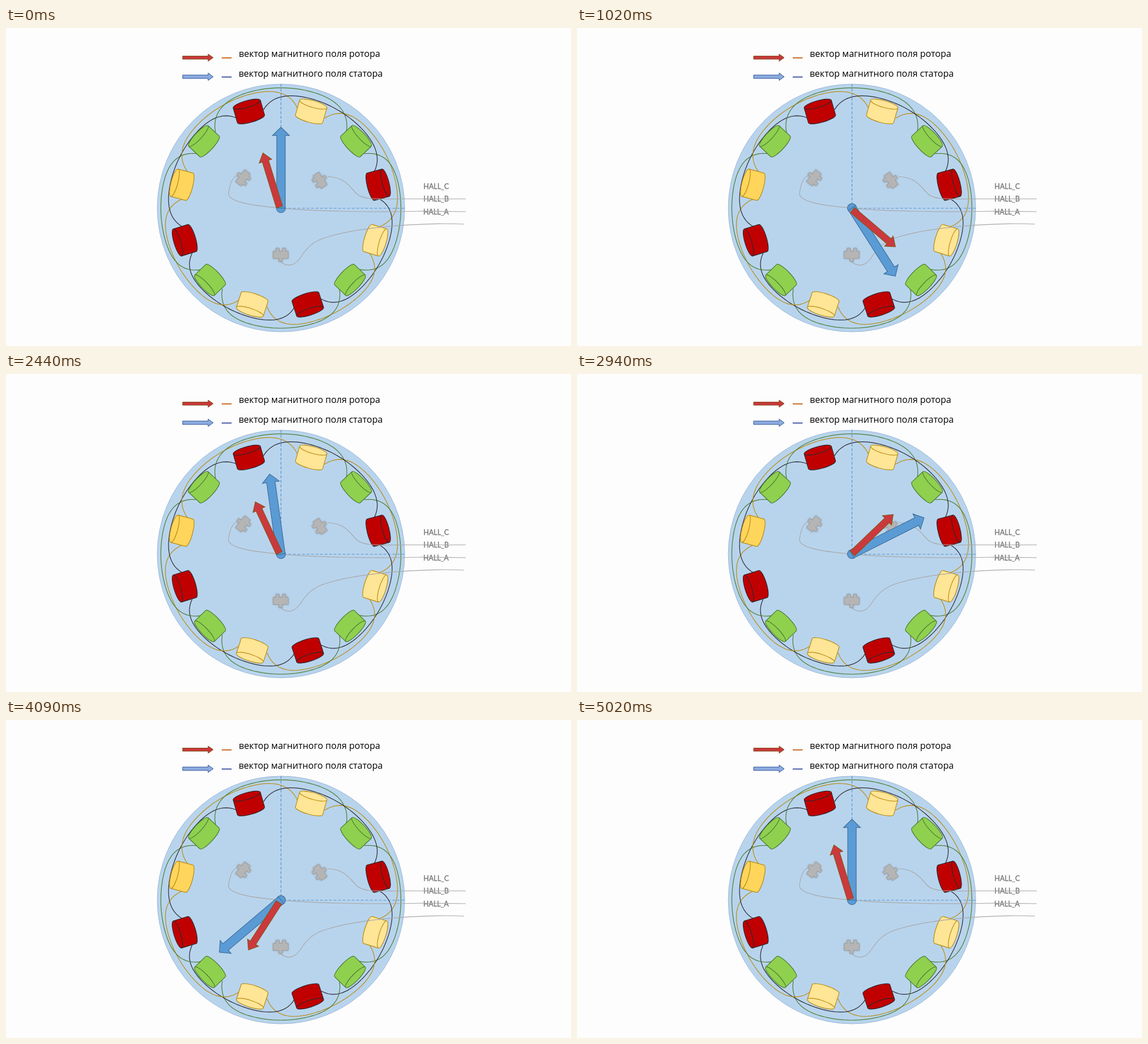
Write an HTML page that moves like this. It is 998 px wide and 561 px high and loops after 5.06 s.

```html
<!DOCTYPE html>
<html lang="ru">
<head>
<meta charset="utf-8">
<style>
html, body { margin: 0; width: 100%; height: 100%; overflow: hidden; background: #fdfdfd }
svg { display: block; width: 998px; height: 561px }
.legend { font: 16px "Open Sans", "Noto Sans", sans-serif }
.hall { font: 12.5px Lato, "Open Sans", sans-serif; fill: #787878; stroke: #787878; stroke-width: .35 }
#wires, .leads { fill: none; stroke-width: 1.2 }
.leads { stroke: #a8a8a8 }
#sensors { fill: #b5b5b5; stroke: #9b9b9b; stroke-width: .8 }
#coils { stroke-width: 1.2; stroke-linejoin: round }
</style>
</head>
<body>
<svg viewBox="0 0 998 561">
  <filter id="glow" x="-50%" y="-50%" width="200%" height="200%">
    <feDropShadow dx="0" dy="0" stdDeviation="1.5" flood-color="#777" flood-opacity=".7"/>
  </filter>
  <circle cx="485.7" cy="317.5" r="218.5" fill="#b8d4ed" stroke="#9fb8d6"/>
  <path d="M485.7 99V318H704" fill="none" stroke="#5792cf" stroke-width="1.2" stroke-dasharray="5 3"/>

  <g class="legend">
    <path d="M312 49.5H357V46L366 52.3L357 58.6V55H312Z" fill="#c9383c" stroke="#7f4a14"/>
    <path d="M312 83H357V79.5L366 86L357 92.5V89H312Z" fill="#8cabdf" stroke="#2f5597"/>
    <path d="M381 52.7H398.5" stroke="#c8681f" stroke-width="2"/>
    <path d="M381 86.5H398.5" stroke="#4458a8" stroke-width="2"/>
    <text x="411.3" y="51">вектор магнитного поля ротора</text>
    <text x="411" y="85.5">вектор магнитного поля статора</text>
  </g>
  <g class="hall">
    <text x="737.5" y="284">HALL_C</text>
    <text x="737.5" y="306">HALL_B</text>
    <text x="737" y="328.5">HALL_A</text>
  </g>

  <g id="wires"></g>
  <g id="coils"></g>
  <g class="leads">
    <path d="M568 262C600 264 607 280 619 292S660 301.5 700 301.5H812"/>
    <path d="M409 261C397 262 394 285 393 292C393 312 470 316 500 319S640 326 740 323L812 324"/>
    <path d="M484 411C496 423 510 420 520 405S540 376 570 368C630 350 740 343 809 346"/>
  </g>
  <g id="sensors"></g>

  <g fill="#5b9bd5" stroke="#41719c" stroke-width="1.2">
    <circle cx="485.7" cy="317.7" r="8"/>
    <path id="stator" d="M-7.5 0V-128H-15L0-142.5L15-128H7.5V0Z"/>
  </g>
  <path id="rotor" d="M-5.7-3.5V-88H-11.5L0-103L11.5-88H5.7V-3.5Z" fill="#cb393d" stroke="#85561a" stroke-width="1.2"/>
</svg>
<script>
const $ = id => document.getElementById(id);
const place = (x, y, angle) => `translate(${x} ${y}) rotate(${angle})`;

// Point at a clockwise angle from the top
function polar(r, degrees, cx = 484, cy = 316.5) {
  const a = degrees * Math.PI / 180;
  return [cx + r * Math.sin(a), cy - r * Math.cos(a)];
}

function add(parent, attrs) {
  const path = document.createElementNS('http://www.w3.org/2000/svg', 'path');
  for (const key in attrs) path.setAttribute(key, attrs[key]);
  $(parent).append(path);
}

// The left half of the ring mirrors the right half
const right = [18, 49, 77, 109, 136, 164];
const angles = [...right, ...right.map(a => 360 - a).reverse()];
const phases = [
  { fill: '#ffe596', stroke: '#b98c12', reach: 208 },
  { fill: '#90d04f', stroke: '#4b7c31', reach: 212 },
  { fill: '#c00000', stroke: '#2d2a30', reach: 200 }
];

// A wire leaves one coil, swings outward past two others and enters the next of its phase
function wire(from, to, reach) {
  const points = [];
  for (let u = 0; u <= 1.001; u += .02) {
    const swing = 1 - (2 * u - 1) ** 6;
    points.push(polar(176 + (reach - 176) * swing, from + (to - from) * u, 485.5, 317.5));
  }
  return 'M' + points.join('L');
}

angles.forEach((angle, i) => {
  const { fill, stroke, reach } = phases[i % 3];
  const next = angles[(i + 3) % 12] + (i > 8 ? 360 : 0);
  const tilt = angle < 180 ? angle - 2 : angle + 2;
  add('wires', { d: wire(angle + 8, next - 8, reach), stroke });
  add('coils', {
    d: 'M-25-13.5A25 6 0 0 1 25-13.5V13.5A25 6 0 0 1-25 13.5ZM25-13.5A25 6 0 0 1-25-13.5',
    transform: place(...polar(178, angle), tilt),
    fill: i == 9 ? '#ffd55c' : fill, stroke
  });
});

for (const angle of [56, 180, 308])
  add('sensors', {
    d: 'M-13-6H-8V-11.5H-2.5V-6H3.5V-11.5H9V-6H13.5V6.5H3V12H-3V6.5H-13Z',
    transform: place(...polar(84, angle, 485, 316), angle + 180), filter: 'url(#glow)'
  });

const LOOP = 5060, TURN = 2500, STEP = 33.03;

function draw(now) {
  const t = Math.floor((now % LOOP + 6) / STEP) * STEP;
  const angle = Math.min(t, 2 * TURN) / TURN * 360;
  $('stator').setAttribute('transform', place(485.7, 317.7, angle));
  $('rotor').setAttribute('transform', place(484, 319, angle - 17));
  requestAnimationFrame(draw);
}
draw(0);
</script>
</body>
</html>
```
